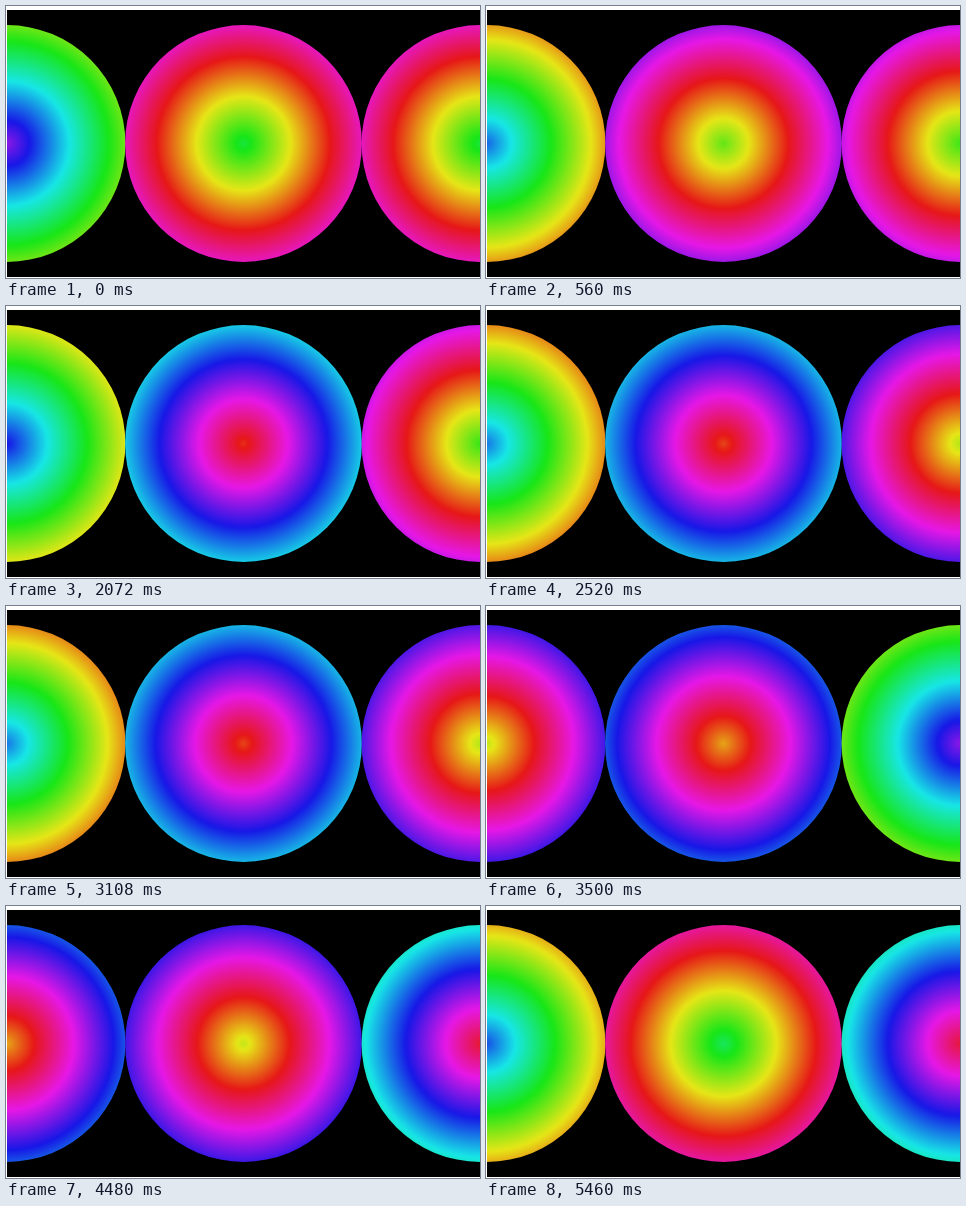
Animation, 474 px wide and 272 px high, one loop 5.64 s. Source, as an HTML page with a canvas:

```html
<!DOCTYPE html>
<html lang="en">
<head>
<meta charset="utf-8">
<title>Hue circles</title>
<style>
  html, body { margin: 0; width: 100%; height: 100%; overflow: hidden; background: #fff; }
  canvas { display: block; }
</style>
</head>
<body>
<canvas id="stage" width="474" height="272"></canvas>
<script>
const ctx = document.getElementById('stage').getContext('2d');
const LOOP = 5640;
const RADIUS = 118.4;
const CENTER_Y = 137.5;
const CENTERS_X = [1, 237.5, 474];
const HUE_SPAN = 179;

// Centre hue of each circle, left to right, from the given time on.
const STEPS = [
  { at: 0,    hues: [274, 131, 131] },
  { at: 560,  hues: [217, 98, 109] },
  { at: 1400, hues: [241, 7, 111] },
  { at: 2520, hues: [212, 13, 75] },
  { at: 3500, hues: [71, 41, 274] },
  { at: 4480, hues: [41, 70, 352] },
  { at: 5460, hues: [223, 140, 349] }
];

// HSV colour with saturation and value both at 0.9.
function hueColor(hue) {
  const channel = n => {
    const k = (n + hue / 60 + 12) % 6;
    return Math.round(230 - 207 * Math.max(0, Math.min(k, 4 - k, 1)));
  };
  return `rgb(${channel(5)},${channel(3)},${channel(1)})`;
}

function drawCircle(x, hue) {
  const fill = ctx.createRadialGradient(x, CENTER_Y, 0, x, CENTER_Y, RADIUS);
  const stops = 60;
  for (let i = 0; i <= stops; i++) {
    fill.addColorStop(i / stops, hueColor(hue - HUE_SPAN * i / stops));
  }
  ctx.fillStyle = fill;
  ctx.beginPath();
  ctx.arc(x, CENTER_Y, RADIUS, 0, Math.PI * 2);
  ctx.fill();
}

function draw(step) {
  ctx.fillStyle = '#fff';
  ctx.fillRect(0, 0, 474, 272);
  ctx.save();
  ctx.beginPath();
  ctx.rect(1, 4, 473, 267);
  ctx.clip();
  ctx.fillStyle = '#000';
  ctx.fillRect(0, 0, 474, 272);
  CENTERS_X.forEach((x, i) => drawCircle(x, step.hues[i]));
  ctx.restore();
}

let start = null;
let shown = null;

function tick(now) {
  if (start === null) start = now;
  const t = (now - start) % LOOP;
  const step = STEPS.filter(s => s.at <= t).pop();
  if (step !== shown) draw(shown = step);
  requestAnimationFrame(tick);
}

draw(shown = STEPS[0]);
requestAnimationFrame(tick);
</script>
</body>
</html>
```
